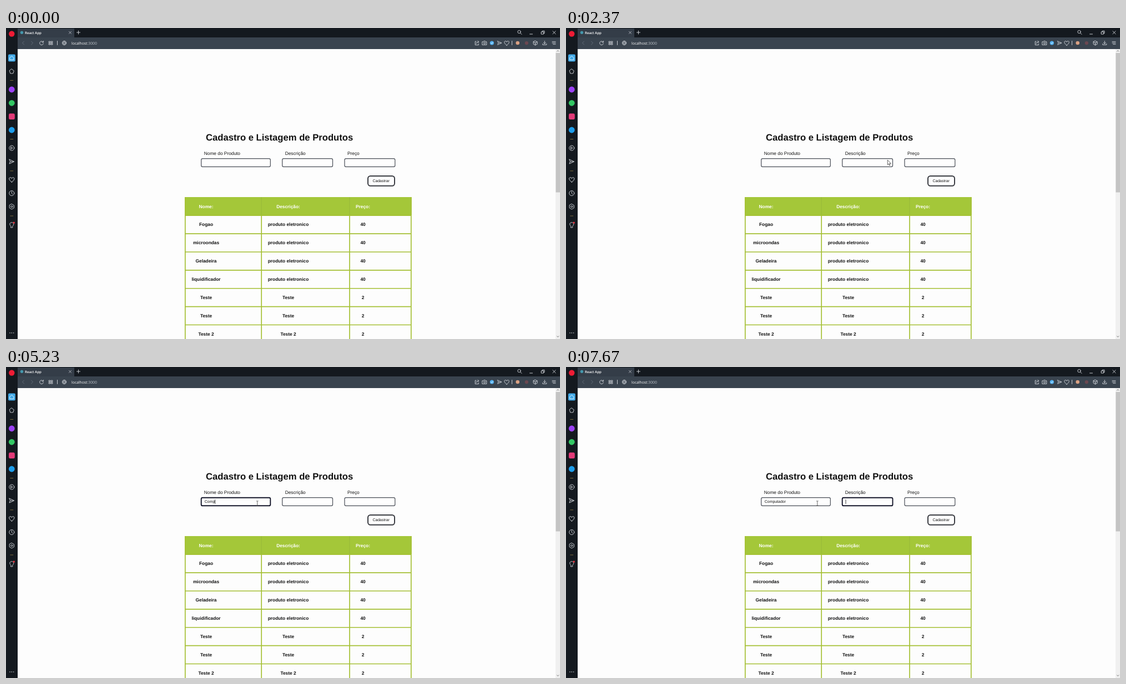
Write an HTML page that moves like this. It is 998 px wide and 561 px high and loops after 8000 ms.

```html
<!DOCTYPE html>
<html lang="pt">
<head>
<meta charset="utf-8">
<title>Cadastro</title>
<style>
html, body { margin: 0; width: 100%; height: 100%; overflow: hidden; background: #fdfdfd; }
svg { display: block; width: 998px; height: 561px; }
text { font-family: "Liberation Sans", Arial, sans-serif; font-size: 8.32px; fill: #111; text-rendering: geometricPrecision; }
.ui { font-family: "Open Sans", "Noto Sans", sans-serif; fill: #fff; }
.b { font-weight: bold; }
.small { font-size: 6.93px; }
.mid { text-anchor: middle; }
.icon { fill: none; stroke: #d5d9de; stroke-width: .9; stroke-linejoin: round; stroke-linecap: round; }
.dim { stroke: #66707c; }
.field { fill: #fefefe; stroke: #474c55; stroke-width: 1.2; }
.focus { stroke: #14162a; stroke-width: 1.9; }
</style>
</head>
<body>
<svg viewBox="0 0 998 561">
  <defs>
    <path id="heart" d="M0 4C-6 0-4.5-4-2-3.6Q-.6-3.4 0-2Q.6-3.4 2-3.6C4.5-4 6 0 0 4Z"/>
    <path id="send" d="M-4-4L4.5 0-4 4-2.6 0ZM-2.6 0H4"/>
    <path id="dash" d="M-2.5 0H2.5" stroke="#8a7440"/>
    <path id="cross" d="M-2.6-2.6L2.6 2.6M2.6-2.6L-2.6 2.6"/>
  </defs>

  <!-- browser frame -->
  <path fill="#14191f" d="M0 0H998V38H21V561H0Z"/>
  <path fill="#3a444f" d="M21 17H998V38H21Z"/>
  <path fill="#343d48" d="M21 1H123V17H21Z"/>
  <circle cx="28.5" cy="8.3" r="2.7" fill="#4598ad"/>
  <text class="ui" x="34" y="10.7" style="font-size:6.15px;font-weight:600">React App</text>
  <text class="ui" x="118" y="29.5" style="font-size:6.8px">localhost<tspan fill="#c3c8ce">:3000</tspan></text>

  <g class="icon">
    <use href="#cross" transform="translate(115.5 8.3) scale(.8)"/>
    <path d="M127.5 8H133.5M130.5 5V11"/>
    <path class="dim" d="M32.5 24L29.5 27 32.5 30M45.5 24L48.5 27 45.5 30"/>
    <path d="M67 25.5A3.4 3.4 0 1 0 67.4 28M67.4 23.4V25.8H65"/>
    <path d="M77.5 24.2h2.4v2.2h-2.4zM81.5 24.2h2.4v2.2h-2.4zM77.5 27.8h2.4v2.2h-2.4zM81.5 27.8h2.4v2.2h-2.4zM92.5 23.5V30.5"/>
    <circle cx="105" cy="27" r="3.6"/>
    <path d="M101.4 27H108.6M105 23.4Q101.8 27 105 30.6Q108.2 27 105 23.4" stroke-width=".7"/>
    <path d="M847 24.2H845.2V30.6H851.3V28.5M847 28.3Q847 25.2 851.4 25M849.8 23.2L851.8 25 849.8 27"/>
    <path d="M858.2 24.8H860L860.8 23.6H863.2L864 24.8H865.8V30.4H858.2Z"/>
    <circle cx="862" cy="27.3" r="1.6"/>
    <use href="#send" transform="translate(889 27) scale(.85)"/>
    <use href="#heart" x="902" y="27.2"/>
    <path d="M911.5 23.5V30.5"/>
    <path d="M953.5 23.3L957 25V29L953.5 30.9 950 29V25ZM950 25L953.5 27 957 25M953.5 27V30.9"/>
    <path d="M970.3 23.5V28.3M968.2 26.3L970.3 28.4 972.4 26.3M966.8 28.5V30.3H973.8V28.5"/>
    <path d="M984 24.7H990M984 27H990M985.5 29.3H990"/>
    <circle cx="924.5" cy="7" r="2.7"/>
    <path d="M926.5 9L929 11.5M943.5 11H948.5"/>
    <path d="M964.5 7H968.5V11H964.5ZM966 7V5.3H970V9.5H968.5"/>
    <use href="#cross" x="987.5" y="8.2"/>
  </g>
  <circle cx="875.3" cy="27" r="3.6" fill="#55b4f5"/>
  <path d="M873.6 27L875 28.4 877.3 25.8" fill="none" stroke="#fff" stroke-width=".8"/>
  <circle cx="921.7" cy="27" r="3.3" fill="#d9a184"/>
  <circle cx="937.8" cy="27.2" r="3.1" fill="#6b4750"/>

  <!-- sidebar -->
  <circle cx="10.3" cy="10.5" r="5.2" fill="#ee1c35"/>
  <rect x="4" y="47.5" width="12.8" height="13" rx="2" fill="#42aae8"/>
  <path d="M6.8 53.5L10.3 50.5 13.8 53.5V57.5H6.8Z" fill="none" stroke="#e9f6ff" stroke-width=".9"/>
  <circle cx="10.3" cy="111" r="5.4" fill="#9a40f4"/>
  <circle cx="10.3" cy="135.3" r="5.4" fill="#32c764"/>
  <rect x="5" y="154.3" width="10.8" height="10.8" rx="2.4" fill="#e23a78"/>
  <circle cx="10.3" cy="184" r="5.4" fill="#1d9cea"/>
  <g class="icon">
    <path d="M10.3 74L14.3 77.2 12.8 82H7.8L6.3 77.2Z"/>
    <use href="#dash" x="10.3" y="94.5"/><use href="#dash" x="10.3" y="200.5"/>
    <use href="#dash" x="10.3" y="257.8"/><use href="#dash" x="10.3" y="339"/>
    <circle cx="10.3" cy="216.5" r="4.5"/><path d="M9 214.5L12.2 216.5 9 218.5Z"/>
    <use href="#send" x="10" y="241"/>
    <use href="#heart" transform="translate(10.3 273.6) scale(1.1)"/>
    <circle cx="10.3" cy="298" r="4.5"/><path d="M10.3 295V298.3L12 299.6"/>
    <path d="M10.3 317.5L14.4 319.8V324.6L10.3 327 6.2 324.6V319.8Z"/><circle cx="10.3" cy="322.2" r="1.6"/>
    <path d="M8.8 357.5C5 354 7 350.8 10.3 350.8S15.6 354 11.8 357.5V360H8.8Z"/>
    <path d="M7 550H7.1M10.3 550H10.4M13.6 550H13.7" stroke-width="1.5"/>
  </g>
  <circle cx="14.2" cy="351.2" r="1.6" fill="#ee3340"/>

  <!-- scrollbar -->
  <path fill="#f0f0f0" d="M990 38H998V561H990Z"/>
  <path fill="#c4c4c4" d="M990.4 45H998V296.5H990.4Z"/>
  <path d="M992.3 42.5L994.2 40.5 996.1 42.5M992.3 555.5L994.2 557.5 996.1 555.5" fill="none" stroke="#666" stroke-width=".9"/>

  <!-- form -->
  <text class="b" x="360" y="202.8" style="font-size:16.64px">Cadastro e Listagem de Produtos</text>
  <text x="356.8" y="228.5">Nome do Produto</text>
  <text x="502.7" y="228.5">Descrição</text>
  <text x="615" y="228.5">Preço</text>
  <rect class="field" id="name" x="351.7" y="235.7" width="124.6" height="14.6" rx="2.4"/>
  <rect class="field" id="desc" x="497.7" y="235.7" width="90.8" height="14.6" rx="2.4"/>
  <rect class="field" x="610" y="235.7" width="90.8" height="14.6" rx="2.4"/>
  <rect x="652" y="267" width="48" height="17.8" rx="4.5" fill="#fefefe" stroke="#3b3d43" stroke-width="2"/>
  <text class="small mid" x="675.6" y="278.3">Cadastrar</text>
  <text class="small" id="typed" x="357.8" y="245.4"></text>
  <path id="caret" d="M0 239V247" stroke="#111" stroke-width=".8"/>

  <g id="table"></g>

  <path id="arrow" d="M0 0V8.7L2 6.9 3.3 9.9 4.7 9.3 3.4 6.4H6.1Z" fill="#fff" stroke="#222" stroke-width=".7"/>
  <path id="beam" d="M-1.8-4.2H-.5L0-3.8 .5-4.2H1.8M0-3.8V3.8M-1.8 4.2H-.5L0 3.8 .5 4.2H1.8" fill="none" stroke="#444" stroke-width=".8"/>
</svg>
<script>
const $ = id => document.getElementById(id);
const LOOP = 8000, ROW = 32.87, TOP = 305;

const appliance = ['produto eletronico', 40];
const rows = [
  ['Nome:', 'Descrição:', 'Preço:'],
  ...['Fogao', 'microondas', 'Geladeira', 'liquidificador'].map(n => [n, ...appliance]),
  ['Teste', 'Teste', 2], ['Teste', 'Teste', 2], ['Teste 2', 'Teste 2', 2]
];
const columns = [360.5, 508.5, 643];

function drawTable() {
  let lines = 'M322.8 305V561M729.8 305V561M460.2 338V561M619 338V561';
  let cells = '';
  rows.forEach((row, i) => {
    const y = TOP + i * ROW;
    if (i) lines += `M322 ${y + .4}H730.6`;
    row.forEach((s, c) => {
      cells += `<text class="b mid" x="${columns[c]}" y="${y + 19.6}"${i ? '' : ' style="fill:#fff"'}>${s}</text>`;
    });
  });
  $('table').innerHTML =
    `<path fill="#a4c739" d="M322 305H730.6V338H322Z"/>
     <path d="M460.2 305V338M619 305V338" stroke="#98b93a"/>
     <path d="${lines}" stroke="#a5c034" stroke-width="1.7"/>${cells}`;
}

// Pointer stops: time, x, y, easing power pair (in, out)
const linear = p => p, easeIn = p => p ** 1.6, easeOut = p => 1 - (1 - p) ** 2;
const smooth = p => p * p * (3 - 2 * p);
const stops = [
  [470, 981, 92, linear],
  [830, 864, 80, easeOut],
  [2000, 864, 80, linear],
  [2370, 580, 238, easeIn],
  [2800, 421, 255, easeOut],
  [2870, 421, 252, linear],
  [3070, 423, 243, easeOut],
  [3600, 452.8, 246, smooth],
  [LOOP, 452.8, 246, linear]
];

function pointerAt(t) {
  const i = Math.max(1, stops.findIndex(s => s[0] > t));
  const [t0, x0, y0] = stops[i - 1], [t1, x1, y1, ease] = stops[i];
  const p = ease(Math.max(0, (t - t0) / (t1 - t0)));
  return [x0 + (x1 - x0) * p, y0 + (y1 - y0) * p];
}

const word = 'Computador';
const keyTimes = [3700, 4370, 4500, 4870, 5270, 5530, 5700, 5930, 6100, 6230];
const FOCUS = 3430, TAB = 6470;

function caretAlpha(t) {
  if (t < FOCUS) return 0;
  for (const [off, on] of [[4200, 4370], [7030, 7670]])
    if (t >= off && t < on) return t < off + 70 ? .5 : 0;
  return 1;
}

function draw(t) {
  $('typed').textContent = word.slice(0, keyTimes.filter(k => k <= t).length);
  $('name').classList.toggle('focus', t >= FOCUS && t < TAB);
  $('desc').classList.toggle('focus', t >= TAB);
  const x = t < TAB ? 358 + $('typed').getComputedTextLength() : 504;
  $('caret').setAttribute('transform', `translate(${x})`);
  $('caret').setAttribute('opacity', caretAlpha(t));

  const overField = t >= 2900 || (t > 2400 && t < 2470);
  const at = `translate(${pointerAt(t)})`;
  for (const [id, on] of [['arrow', t >= 470 && !overField], ['beam', overField]]) {
    $(id).setAttribute('transform', at);
    $(id).setAttribute('visibility', on ? 'visible' : 'hidden');
  }
}

function tick() {
  draw(performance.now() % LOOP);
  requestAnimationFrame(tick);
}
drawTable();
tick();
</script>
</body>
</html>
```
